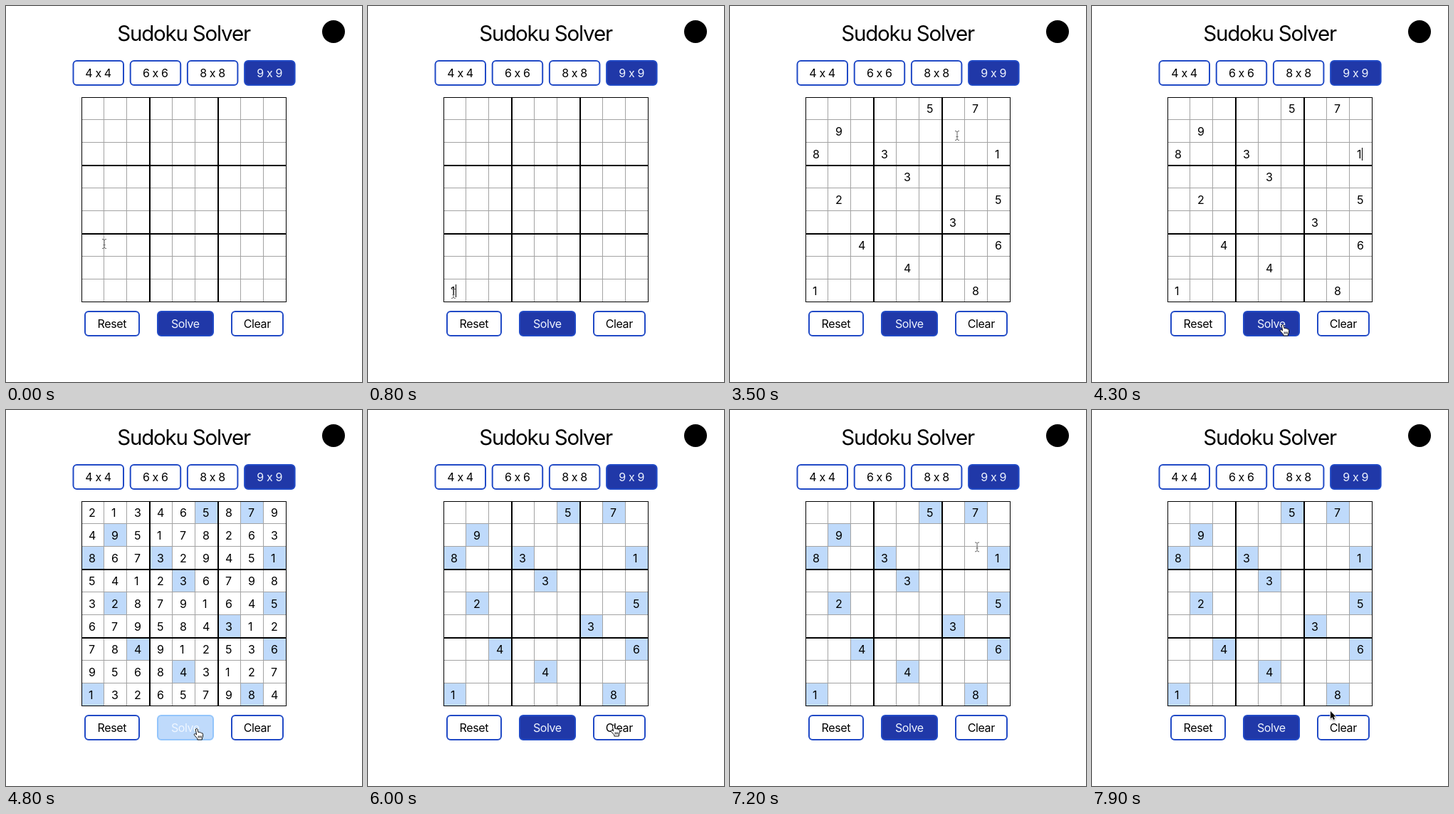
An HTML page with a canvas for the animation above (8 s loop, 500x528 px).

```html
<!DOCTYPE html>
<html lang="en">
<head>
<meta charset="utf-8">
<title>Sudoku Solver</title>
<style>
  html, body { margin: 0; width: 100%; height: 100%; overflow: hidden; background: #fff; }
  canvas { display: block; width: 500px; height: 528px; }
</style>
</head>
<body>
<canvas id="stage" width="500" height="528"></canvas>
<script>
const ctx = document.getElementById('stage').getContext('2d');
const LOOP = 8000, STEP = 100;
const FONT = 'Inter, "Open Sans", sans-serif';
const BLUE = '#214ac6', DEEP = '#2038a8', PALE = '#bfdafb', SKY = '#93c5fb';
const CELL = 32, GRID = { x: 106, y: 128, w: 9 * CELL, h: 9 * CELL };

const PUZZLE = ['.....5.7.', '.9.......', '8..3....1', '....3....', '.2......5',
                '......3..', '..4.....6', '....4....', '1......8.'].join('');
const SOLUTION = solve([...PUZZLE]);

const SIZES = [4, 6, 8, 9].map((n, i) => ({ label: `${n} x ${n}`, x: 93.5 + 80.2 * i, y: 76, w: 72.5, h: 36 }));
const ACTIONS = [['Reset', 110, 78], ['Solve', 212, 80], ['Clear', 316, 74]]
  .map(([label, x, w]) => ({ label, x, y: 428, w, h: 36 }));

// Moments of the interaction, in ms
const CLICK = 700, TYPE = 800, FILL = 3100, FOCUS = 3900, SOLVE = 4500, CLEAR = 6000;

// Pointer moves: start, end, x, y reached
const START = [138, 334];
const MOVES = [
  [0, 500, 120, 404], [900, 1500, 192, 438], [3000, 3100, 319, 182],
  [3500, FOCUS, 370, 208], [FOCUS, 4300, 268, 448], [5400, 5600, 345, 443],
  [6400, 6500, 345, 419], [6500, 6900, 396, 146], [6900, 7300, 338, 201],
  [7300, 7700, 318, 400], [7700, 7900, 335, 423]
];

// Fills the first empty cell with the smallest digit that leads to a solution.
function solve(cells) {
  const i = cells.indexOf('.');
  if (i < 0) return cells;
  const r = Math.floor(i / 9), c = i % 9;
  const box = (r - r % 3) * 9 + c - c % 3;
  const used = new Set();
  for (let k = 0; k < 9; k++) {
    used.add(cells[r * 9 + k]).add(cells[k * 9 + c]);
    used.add(cells[box + Math.floor(k / 3) * 9 + k % 3]);
  }
  for (const digit of '123456789') {
    if (used.has(digit)) continue;
    cells[i] = digit;
    if (solve(cells)) return cells;
  }
  cells[i] = '.';
  return null;
}

function pointerAt(t) {
  let [x, y] = START;
  for (const [from, to, toX, toY] of MOVES) {
    const k = Math.min(1, Math.max(0, (t - from) / (to - from)));
    const ease = k * k * (3 - 2 * k);
    x += (toX - x) * ease;
    y += (toY - y) * ease;
  }
  return [x, y];
}

function text(str, x, y, size, color, align, spacing) {
  ctx.font = `400 ${size}px ${FONT}`;
  ctx.letterSpacing = spacing + 'px';
  ctx.textAlign = align;
  ctx.fillStyle = color;
  ctx.fillText(str, x, y);
}

function button(b, fill, border, color) {
  ctx.beginPath();
  ctx.roundRect(b.x + 1, b.y + 1, b.w - 2, b.h - 2, 5);
  ctx.fillStyle = fill;
  ctx.fill();
  ctx.lineWidth = 2;
  ctx.strokeStyle = border;
  ctx.stroke();
  text(b.label, b.x + b.w / 2 - 0.2, b.y + 24, 16, color, 'center', -0.4);
}

function line(pos, width, color) {
  ctx.fillStyle = color;
  ctx.fillRect(GRID.x + pos, GRID.y, width, GRID.h);
  ctx.fillRect(GRID.x, GRID.y + pos, GRID.w, width);
}

function board(t) {
  const solved = t >= SOLVE && t < CLEAR;
  SOLUTION.forEach((digit, i) => {
    const given = PUZZLE[i] !== '.';
    const x = GRID.x + i % 9 * CELL, y = GRID.y + Math.floor(i / 9) * CELL;
    if (given && t >= SOLVE) {
      ctx.fillStyle = PALE;
      ctx.fillRect(x, y, CELL, CELL);
    }
    const typed = t >= TYPE && i === 72;
    if (solved || typed || (given && t >= FILL))
      text(digit, x + 9.9, y + 22, 16, '#000', 'left', 0);
  });
  for (let i = 1; i < 9; i++) if (i % 3) line(i * CELL - 1, 1, '#a3a3a3');
  for (let i = 3; i < 9; i += 3) line(i * CELL - 1, 2, '#000');
  line(0, 1, '#000');
  line(GRID.w - 1, 1, '#000');
}

function caret(t) {
  if (t < CLICK || t >= SOLVE || (t >= FILL && t < FOCUS)) return;
  const [row, col, since] = t < FILL ? [8, 0, TYPE] : [2, 8, FOCUS];
  if (Math.floor(Math.max(0, t - since) / 500) % 2) return;
  ctx.fillStyle = '#000';
  ctx.fillRect(GRID.x + col * CELL + (t < TYPE ? 9 : 17), GRID.y + row * CELL + 7, 1, 18);
}

const inside = (x, y, b) => x >= b.x && x < b.x + b.w && y >= b.y && y < b.y + b.h;

const ARROW = new Path2D('M0 0V10.4L2.4 8.2L4.1 11.9L6 11L4.3 7.5H7.5Z');
const BEAM = new Path2D('M-3 -6.5Q-0.3 -6.5 0 -5V5Q-0.3 6.5 -3 6.5M3 -6.5Q0.3 -6.5 0 -5M0 5Q0.3 6.5 3 6.5M-1.5 1.5H1.5');
const HAND = new Path2D('M-1.6 1Q-1.6 -0.6 -0.3 -0.6Q0.8 -0.6 1.1 0.7L2 4.6Q3.4 3.6 4.2 5Q5.6 4.2 6.4 5.7Q8.4 5.2 8.6 7.4L8.5 10Q8.2 12 7.4 13V15H0.8V13.4L-3.6 8.4Q-4.2 6.8 -2.7 6.6Q-1.6 6.7 -0.4 8Z');
const FINGERS = new Path2D('M2.2 9.5V12.5M4.2 9.5V12.5M6.2 9.5V12.5');

function pointer(t) {
  const [x, y] = pointerAt(t);
  ctx.save();
  ctx.translate(x, y);
  ctx.lineJoin = 'round';
  ctx.lineWidth = 1;
  if (inside(x, y, GRID)) {
    ctx.strokeStyle = '#666';
    ctx.stroke(BEAM);
  } else if (ACTIONS.some(b => inside(x, y, b))) {
    ctx.fillStyle = '#fff';
    ctx.fill(HAND);
    ctx.strokeStyle = '#111';
    ctx.stroke(HAND);
    ctx.stroke(FINGERS);
  } else {
    ctx.shadowColor = 'rgba(0,0,0,.35)';
    ctx.shadowBlur = 2;
    ctx.shadowOffsetY = 1;
    ctx.lineWidth = 1.6;
    ctx.strokeStyle = '#fff';
    ctx.stroke(ARROW);
    ctx.shadowColor = 'transparent';
    ctx.fillStyle = '#000';
    ctx.fill(ARROW);
  }
  ctx.restore();
}

function draw(t) {
  ctx.fillStyle = '#fff';
  ctx.fillRect(0, 0, 500, 528);
  text('Sudoku Solver', 249.5, 49, 29.5, '#000', 'center', -1.2);
  ctx.beginPath();
  ctx.arc(460, 36, 16, 0, Math.PI * 2);
  ctx.fillStyle = '#000';
  ctx.fill();
  for (const b of [...SIZES, ...ACTIONS]) {
    if (b.label === 'Solve' && t >= SOLVE && t < CLEAR) button(b, PALE, SKY, '#eff6ff');
    else if (b.label === 'Solve' || b.label === '9 x 9') button(b, DEEP, BLUE, '#eef3fd');
    else button(b, '#fff', BLUE, '#000');
  }
  board(t);
  caret(t);
  pointer(t);
}

const start = performance.now();
function tick() {
  const t = (performance.now() - start) % LOOP;
  draw(Math.floor(t / STEP) * STEP);
  requestAnimationFrame(tick);
}
tick();
</script>
</body>
</html>
```
